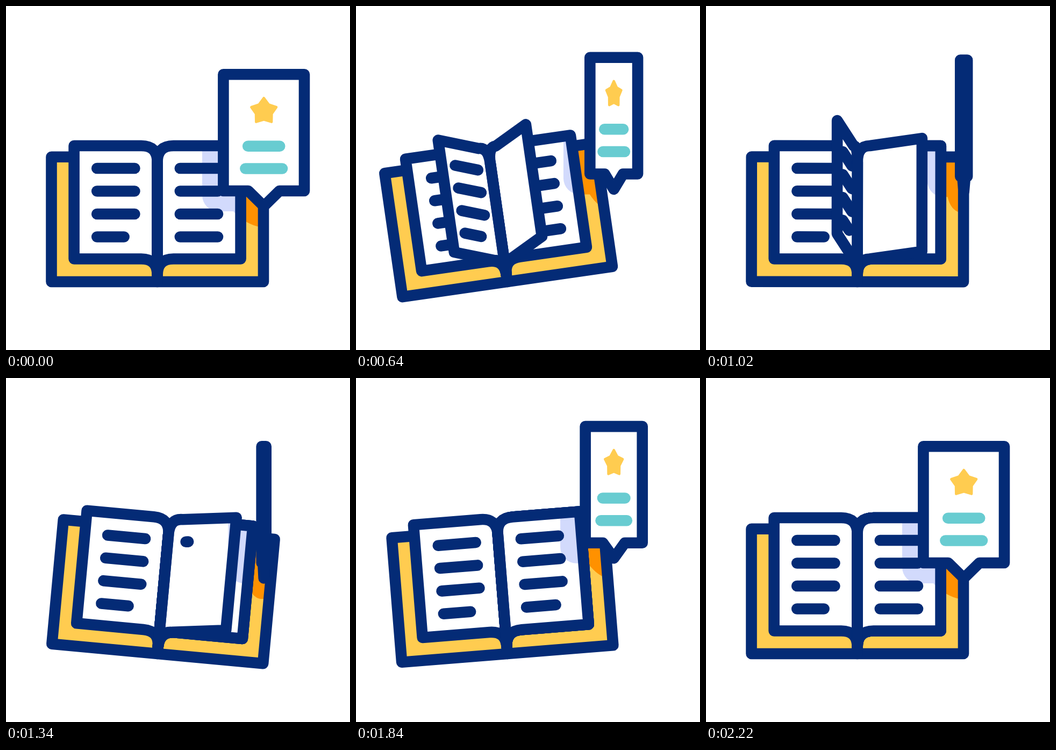
Write an HTML page with a canvas that moves like this. It is 640x640 px and loops after 2.4 s.

```html
<!DOCTYPE html>
<html lang="en">
<head>
<meta charset="utf-8">
<title>Book</title>
<style>
  html, body { margin: 0; width: 100%; height: 100%; overflow: hidden; background: #fff; }
  canvas { display: block; }
</style>
</head>
<body>
<canvas id="stage" width="640" height="640"></canvas>
<script>
const ctx = document.getElementById('stage').getContext('2d');
const LOOP = 2400;
const NAVY = '#042b76', YELLOW = '#ffcc50', ORANGE = '#ff9100', LILAC = '#d2dafc', TEAL = '#68ccd1';
const LINE = 20.6;
const SPINE = 281.6, BASE = 513;        // pivot of the book
const PAGE = 155, FOLD = 30;            // page width, curved part beside the spine
const FLAG_X = 479.7;
const ROWS = [302, 344.5, 387, 429.5];

const TILT = [[200, 0], [808, -10.1], [1200, 8], [1700, -6.1], [2130, 0]];
const RISE = [[200, 0], [826, -40], [1330, 0], [1778, -39.5], [2200, 0]];
const TURN = [[200, 1], [1200, 0], [2200, 1]];
const FLIP = [[0, 1], [280, 0], [605, -1]];
const FLIP_STARTS = [200, 515, 830];
const WRITE_START = 1315, WRITE_STEP = 142;

const clamp = p => Math.max(0, Math.min(1, p));
const smooth = p => p * p * (3 - 2 * p);

function keyed(keys, t) {
  let value = keys[0][1];
  for (let i = 1; i < keys.length; i++) {
    const [t0, a] = keys[i - 1], [t1, b] = keys[i];
    if (t >= t0) value = a + (b - a) * smooth(clamp((t - t0) / (t1 - t0)));
  }
  return value;
}

function polygon(points) {
  const path = new Path2D();
  points.forEach(([x, y]) => path.lineTo(x, y));
  path.closePath();
  return path;
}

function stroke(path, color = NAVY, width = LINE) {
  ctx.strokeStyle = color;
  ctx.lineWidth = width;
  ctx.stroke(path);
}

function bar(a, b, color) {
  const path = new Path2D();
  path.moveTo(...a);
  path.lineTo(...b);
  stroke(path, color);
}

// Fill a shape and lay the flag's shadow on it; the shadow stays upright.
function shaded(path, color, shadow, shadowColor) {
  ctx.fillStyle = color;
  ctx.fill(path);
  ctx.save();
  ctx.clip(path);
  ctx.resetTransform();
  ctx.fillStyle = shadowColor;
  ctx.fill(shadow);
  ctx.restore();
}

function shadowPath(s, dy) {
  const left = 416 - 51 * s, notch = 452 - 29 * s, bottom = 382 + dy, tip = 411 + dy;
  const path = new Path2D();
  path.moveTo(left, 60);
  path.lineTo(left, bottom - 30);
  path.arcTo(left, bottom, left + 30, bottom, 30);
  path.lineTo(notch, bottom);
  path.quadraticCurveTo(456 - 9 * s, tip - 4, 473, tip);
  path.lineTo(580, tip);
  path.lineTo(580, 60);
  path.closePath();
  return path;
}

// u: 1 lies on the left, 0 stands upright, -1 lies on the right.
function drawPage(u, shadow, written) {
  const lift = 62 * (1 - Math.abs(u));
  const at = (d, y) => [SPINE - u * d, y - lift * Math.max(0, d - FOLD) / (PAGE - FOLD)];
  const top = 260, bottom = 470.5;
  const path = new Path2D();
  path.moveTo(...at(0, top + FOLD));
  path.quadraticCurveTo(...at(0, top), ...at(FOLD, top));
  path.lineTo(...at(PAGE, top));
  path.lineTo(...at(PAGE, bottom));
  path.lineTo(...at(FOLD, bottom));
  path.quadraticCurveTo(...at(0, bottom), ...at(0, bottom + FOLD));
  path.closePath();

  shaded(path, '#fff', shadow, LILAC);
  ctx.save();
  ctx.clip(path);
  ROWS.forEach((y, i) => {
    if (u > 0) bar(at(112.4, y), at(i === 3 ? 62 : 42.2, y), NAVY);
    else if (written(i) > 0) bar(at(42.2, y), at(42.2 + 70.2 * written(i), y), NAVY);
  });
  ctx.restore();
  stroke(path);
}

function drawBook(t, shadow) {
  ctx.save();
  ctx.translate(SPINE, BASE);
  ctx.rotate(keyed(TILT, t) * Math.PI / 180);
  ctx.translate(-SPINE, -BASE);

  const cover = polygon([[84.5, 280.7], [479, 280.7], [479, BASE], [84.5, BASE]]);
  shaded(cover, YELLOW, shadow, ORANGE);
  stroke(cover);

  drawPage(1, shadow);
  drawPage(-1, shadow, () => 1);
  FLIP_STARTS.forEach((start, n) => {
    if (t <= start) return;
    const written = i => n < 2 ? 0 : smooth(clamp((t - WRITE_START) / WRITE_STEP - i));
    drawPage(keyed(FLIP, t - start), shadow, written);
  });
  bar([SPINE, 290], [SPINE, BASE], NAVY);
  ctx.restore();
}

function drawFlag(s, dy) {
  const at = (x, y) => [FLAG_X + x * s, y + dy];
  const frame = polygon([
    at(-75.3, 127.3), at(75.3, 127.3), at(75.3, 344), at(29, 344),
    at(0, 372.5), at(-29, 344), at(-75.3, 344)
  ]);
  ctx.fillStyle = '#fff';
  ctx.fill(frame);

  const star = polygon(Array.from({ length: 10 }, (_, i) => {
    const r = i % 2 ? 15.5 : 24.6, a = i * Math.PI / 5;
    return at(r * Math.sin(a), 195.8 - r * Math.cos(a));
  }));
  ctx.fillStyle = YELLOW;
  ctx.fill(star);
  stroke(star, YELLOW, 4.4);

  bar(at(-29.5, 260.7), at(29.5, 260.7), TEAL);
  bar(at(-34.3, 302.5), at(34.3, 302.5), TEAL);
  stroke(frame);
}

function draw(now) {
  const t = now % LOOP;
  const s = keyed(TURN, t), dy = keyed(RISE, t);
  ctx.fillStyle = '#fff';
  ctx.fillRect(0, 0, 640, 640);
  ctx.lineCap = ctx.lineJoin = 'round';
  drawBook(t, shadowPath(s, dy));
  drawFlag(s, dy);
}

let begin;
function tick(now) {
  begin ??= now;
  draw(now - begin);
  requestAnimationFrame(tick);
}
draw(0);
requestAnimationFrame(tick);
</script>
</body>
</html>
```
